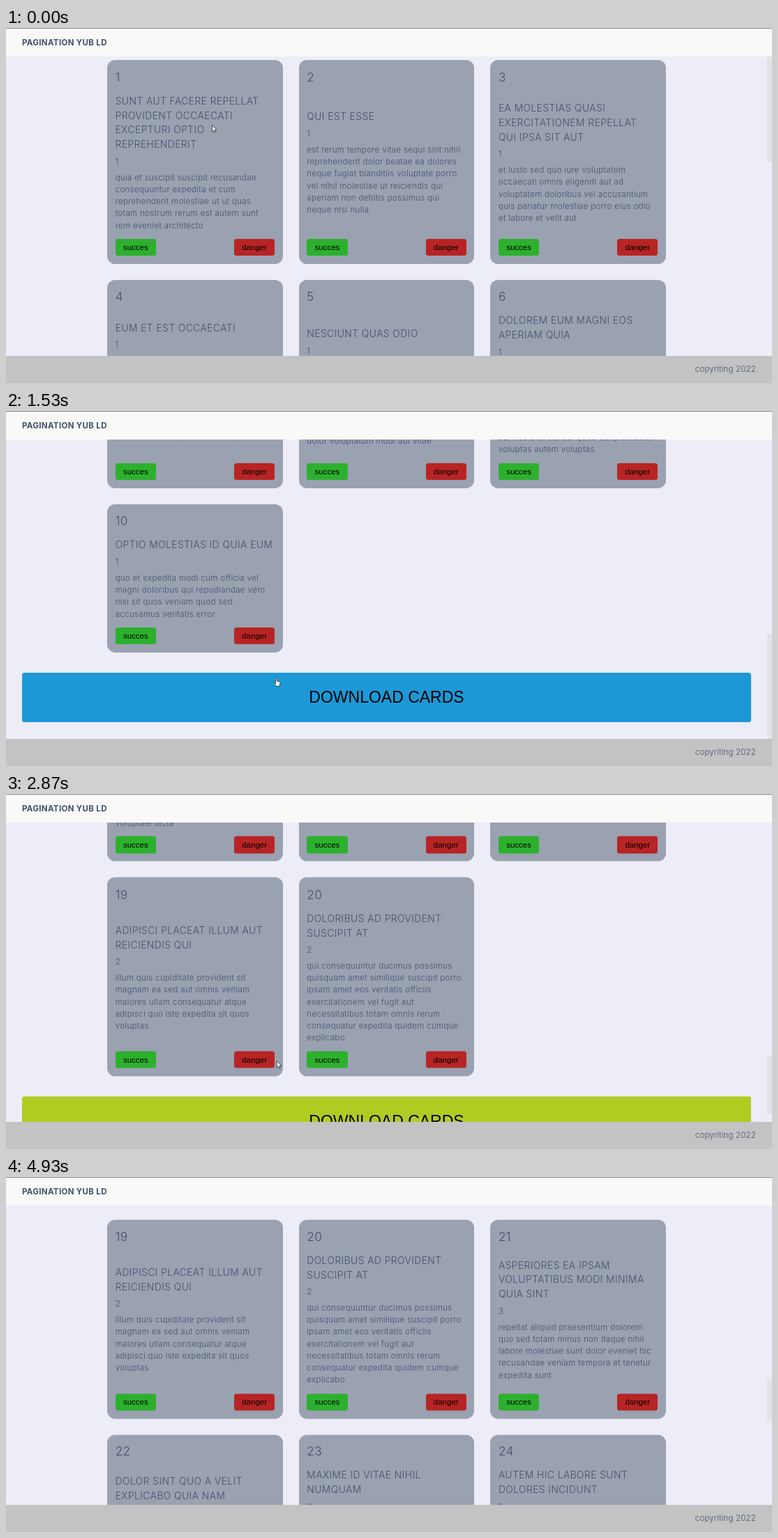
An HTML page that plays this animation: 1098 px wide and 510 px high, repeating every 5540 ms.

```html
<!DOCTYPE html>
<html lang="en">
<head>
<meta charset="utf-8">
<title>Pagination</title>
<style>
html, body { margin: 0; width: 1098px; height: 510px; overflow: hidden; }
body {
  position: relative; background: #ecedf6; color: #42506a;
  font: 350 11.5px/17.25px Inter, sans-serif; letter-spacing: .03em; white-space: nowrap;
}
body > *, .card, .card > *, #more { position: absolute; box-sizing: border-box; }
header { left: 0; top: 0; width: 1098px; height: 41px; padding: 12px 23px; background: #f9f9f8; border-top: 1px solid #85858a; font-weight: 700; }
footer { left: 0; top: 471px; width: 1098px; height: 39px; padding: 11px 23px; background: #c3c3c3; letter-spacing: .015em; text-align: right; }
#view { left: 0; top: 41px; width: 1098px; height: 430px; overflow: hidden; }
#list { position: absolute; left: 0; top: 5.4px; width: 1098px; }
.card { width: 251.6px; border-radius: 11.5px; background: #9aa1b1; }
.num { left: 11.5px; top: 11.5px; font-size: 17.25px; line-height: 25.9px; }
.text { left: 11.5px; margin-top: .4px; }
.title { font-size: 13.8px; line-height: 20.7px; letter-spacing: .033em; text-transform: uppercase; }
.user { margin: 5.75px 0; }
.btn { bottom: 11.5px; width: 58.3px; height: 24.6px; border-radius: 3.5px; color: #000; font: 11.5px/24.6px "Liberation Sans", Arial, sans-serif; letter-spacing: 0; text-align: center; }
.ok { left: 11.5px; background: #2db02e; }
.bad { right: 11.5px; background: #b82424; }
#more { left: 23px; width: 1045px; height: 71.3px; border-radius: 3.5px; color: #000; font: 23px/71.3px "Liberation Sans", Arial, sans-serif; letter-spacing: 0; text-align: center; }
#thumb { left: 1091px; width: 7px; background: #e2e2e7; }
#cursor { left: 0; top: 0; width: 14px; height: 16px; overflow: visible; }
</style>
</head>
<body>
<div id="view"><div id="list"><div id="more">DOWNLOAD CARDS</div></div></div>
<div id="thumb"></div>
<header>PAGINATION YUB LD</header>
<footer>copyriting 2022</footer>
<svg id="cursor" fill="#fff" stroke="#222" stroke-width=".8" stroke-linejoin="round">
  <path id="arrow" d="M.5 .5V10L2.6 8.1 4 11.3 5.6 10.6 4.2 7.5H7z"/>
  <path id="hand" d="M-1 6.5V1.2a1 1 0 0 1 2 0V5l3.2.7c.8.2 1.2.8 1 1.6l-.7 5h-5L-3.2 8.8c-.4-.8.6-1.5 1.2-.9l1 .9z"/>
</svg>
<script>
// One card per line: title ; body, with | as line break
const posts = `sunt aut facere repellat|provident occaecati|excepturi optio|reprehenderit;quia et suscipit suscipit recusandae|consequuntur expedita et cum|reprehenderit molestiae ut ut quas|totam nostrum rerum est autem sunt|rem eveniet architecto
qui est esse;est rerum tempore vitae sequi sint nihil|reprehenderit dolor beatae ea dolores|neque fugiat blanditiis voluptate porro|vel nihil molestiae ut reiciendis qui|aperiam non debitis possimus qui|neque nisi nulla
ea molestias quasi|exercitationem repellat|qui ipsa sit aut;et iusto sed quo iure voluptatem|occaecati omnis eligendi aut ad|voluptatem doloribus vel accusantium|quis pariatur molestiae porro eius odio|et labore et velit aut
eum et est occaecati;ullam et saepe reiciendis voluptatem|adipisci sit amet autem assumenda|provident rerum culpa quis hic|commodi nesciunt rem tenetur|doloremque ipsam iure quis sunt|voluptatem rerum illo velit
nesciunt quas odio;repudiandae veniam quaerat sunt sed|alias aut fugiat sit autem sed est|voluptatem omnis possimus esse|voluptatibus quis est aut tenetur|dolor neque
dolorem eum magni eos|aperiam quia;ut aspernatur corporis harum nihil|quis provident sequi mollitia nobis|aliquid molestiae perspiciatis et ea|nemo ab reprehenderit accusantium|quas voluptate dolores velit et et|doloremque molestiae
magnam facilis autem;dolore placeat quibusdam ea quo vitae|magni quis enim qui quis quo nemo|aut saepe quidem repellat excepturi ut|quia sunt ut sequi eos ea sed quas
dolorem dolore est ipsam;dignissimos aperiam dolorem qui eum|facilis quibusdam animi sint suscipit|qui sint possimus cum quaerat magni|maiores excepturi ipsam ut commodi|dolor voluptatum modi aut vitae
nesciunt iure omnis|dolorem tempora et|accusantium;consectetur animi nesciunt iure dolore|enim quia ad veniam autem ut quam|aut nobis et est aut quod aut provident|voluptas autem voluptas
optio molestias id quia eum;quo et expedita modi cum officia vel|magni doloribus qui repudiandae vero|nisi sit quos veniam quod sed|accusamus veritatis error
et ea vero quia laudantium|autem;delectus reiciendis molestiae occaecati|non minima eveniet qui voluptatibus|accusamus in eum beatae sit vel qui|neque voluptates ut commodi qui|incidunt ut animi commodi
in quibusdam tempore odit|est dolorem;itaque id aut magnam praesentium|quia et ea odit et ea voluptas et|sapiente quia nihil amet occaecati quia|id voluptatem incidunt ea est distinctio|odio
dolorum ut in voluptas|mollitia et saepe quo|animi;aut dicta possimus sint mollitia|voluptas commodi quo doloremque|iste corrupti reiciendis voluptatem|eius rerum sit cumque quod eligendi|laborum minima perferendis|recusandae assumenda consectetur|porro architecto ipsum ipsam
voluptatem eligendi optio;fuga et accusamus dolorum|perferendis illo voluptas non|doloremque neque facere ad qui|dolorum molestiae beatae sed aut|voluptas totam sit illum
eveniet quod temporibus;reprehenderit quos placeat velit|minima officia dolores impedit|repudiandae molestiae nam voluptas|recusandae quis delectus officiis|harum fugiat vitae
sint suscipit perspiciatis|velit dolorum rerum ipsa|laboriosam odio;suscipit nam nisi quo aperiam aut|asperiores eos fugit maiores|voluptatibus quia voluptatem quis|ullam qui in alias quia est consequatur|magni mollitia accusamus ea nisi|voluptate dicta
fugit voluptas sed|molestias voluptatem|provident;eos voluptas et aut odit natus earum|aspernatur fuga molestiae ullam|deserunt ratione qui eos qui nihil|ratione nemo velit ut aut id quo
voluptate et itaque vero|tempora molestiae;eveniet quo quis laborum totam|consequatur non dolor ut et est|repudiandae est voluptatem vel debitis|et magnam
adipisci placeat illum aut|reiciendis qui;illum quis cupiditate provident sit|magnam ea sed aut omnis veniam|maiores ullam consequatur atque|adipisci quo iste expedita sit quos|voluptas
doloribus ad provident|suscipit at;qui consequuntur ducimus possimus|quisquam amet similique suscipit porro|ipsam amet eos veritatis officiis|exercitationem vel fugit aut|necessitatibus totam omnis rerum|consequatur expedita quidem cumque|explicabo
asperiores ea ipsam|voluptatibus modi minima|quia sint;repellat aliquid praesentium dolorem|quo sed totam minus non itaque nihil|labore molestiae sunt dolor eveniet hic|recusandae veniam tempora et tenetur|expedita sunt
dolor sint quo a velit|explicabo quia nam;eos qui et ipsum ipsam suscipit|aut sed omnis non odio|expedita earum mollitia|nam impedit esse
maxime id vitae nihil|numquam;veritatis unde neque eligendi|quae quod architecto quo neque|vitae est illo sit tempora|doloremque fugit quod|et et vel beatae
autem hic labore sunt|dolores incidunt;enim et ex nulla|omnis voluptas quia qui|voluptatem consequatur numquam|aliquam sunt totam|recusandae id dignissimos`
  .split("\n").map(line => line.split(";").map(part => part.split("|")));

const $ = id => document.getElementById(id);
const list = $("list"), more = $("more"), thumb = $("thumb"), cursor = $("cursor");
const GAP = 23, CHROME = 94.7, VIEW = 430;
const blockHeight = ([title, body]) => title.length * 20.7 + 28.75 + body.length * 17.25;

const cards = posts.map(([title, body], i) => {
  const el = document.createElement("div");
  el.className = "card";
  el.style.left = 145.2 + (i % 3) * 274.6 + "px";
  el.innerHTML = `<div class="num">${i + 1}</div><div class="text">
    <div class="title">${title.join("<br>")}</div>
    <div class="user">${Math.ceil((i + 1) / 10)}</div>${body.join("<br>")}</div>
    <div class="btn ok">succes</div><div class="btn bad">danger</div>`;
  list.append(el);
  return el;
});

// Rows take the height of their tallest card; texts are centred in them
function layout(count) {
  let y = 0;
  cards.forEach((el, i) => el.style.display = i < count ? "" : "none");
  for (let i = 0; i < Math.min(count, posts.length); i += 3) {
    const row = posts.slice(i, Math.min(i + 3, count)).map(blockHeight);
    const tallest = Math.max(...row);
    row.forEach((h, k) => {
      const el = cards[i + k];
      el.style.top = y + "px";
      el.style.height = tallest + CHROME + "px";
      el.children[1].style.top = 48.2 + (tallest - h) / 2 + "px";
    });
    y += tallest + CHROME + GAP;
  }
  more.style.display = count > posts.length ? "none" : "";
  more.style.top = y + 5.7 + "px";
}

// Keys are [tick, ...values], linear in between
function at(keys, n) {
  const i = keys.findIndex(k => k[0] > n);
  if (i === 0) return keys[0].slice(1);
  if (i < 0) return keys[keys.length - 1].slice(1);
  const a = keys[i - 1], b = keys[i], p = (n - a[0]) / (b[0] - a[0]);
  return a.slice(1).map((v, k) => v + (b[k + 1] - v) * p);
}

const LOOP = 5540, TICK = 200 / 3;
const scrollKeys = [[6, 0], [7, 480], [8, 775.5], [9, 797.1], [40, 797.1], [41, 1120], [42, 1520], [43, 1726.5], [44, 1784.6]];
const hoverKeys = [[19, 0], [23, 1], [31, 1], [32, 0], [49, 0], [53, 1], [58, 1], [59, 0]];
const moveKeys = [[15, 295, 139], [20, 372, 378], [23, 387.7, 383], [49, 387.7, 383], [53, 393.7, 429.5], [62, 393.7, 429.5], [71, 73, 490], [73, 61.5, 503], [74, 50, 530]];
const pages = [[10, 1227], [20, 2214.6], [30, 3082]];
const lime = [178, 203, 34], blue = [28, 152, 214];
let shown = -1;

function draw(t) {
  const n = Math.floor((t % LOOP + 4) / TICK);
  const page = n < 32 ? 0 : n < 59 ? 1 : 2;
  const [count, total] = pages[page];
  if (page !== shown) layout(count);
  shown = page;

  const [scroll] = at(scrollKeys, n), [hover] = at(hoverKeys, n), [x, y] = at(moveKeys, n);
  list.style.transform = `translateY(${-scroll}px)`;
  thumb.style.top = 41 + scroll / total * VIEW + "px";
  thumb.style.height = VIEW * VIEW / total + "px";
  more.style.background = `rgb(${lime.map((c, i) => Math.round(c + (blue[i] - c) * hover))})`;
  cursor.style.transform = `translate(${x}px, ${y}px)`;
  $("hand").style.display = hover ? "" : "none";
  $("arrow").style.display = hover ? "none" : "";
}

const start = performance.now();
function frame() {
  draw(performance.now() - start);
  requestAnimationFrame(frame);
}
frame();
</script>
</body>
</html>
```
